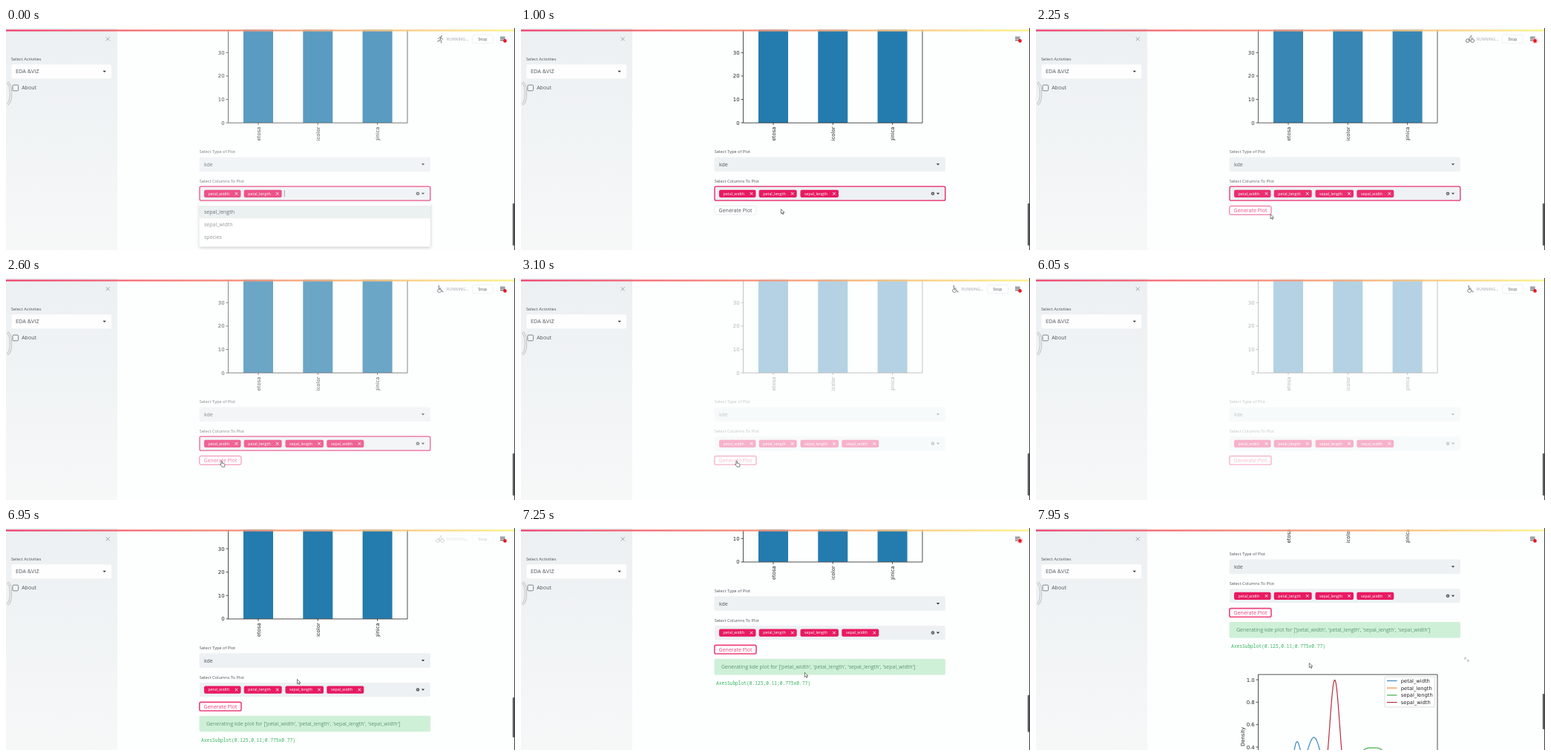
These frames come from a looping animation (686 px wide and 300 px high, 8000 ms). An HTML page:

```html
<!DOCTYPE html>
<html lang="en">
<head>
<meta charset="utf-8">
<title>Plot builder</title>
<style>
  html, body { margin: 0; width: 100%; height: 100%; overflow: hidden; background: #fdfefe; }
  svg { display: block; width: 686px; height: 300px; }
  text { font-family: "Open Sans", "Noto Sans", sans-serif; font-size: 7px; fill: #50555c; white-space: pre; }
  .label { font-size: 5.7px; }
  .chip { font-size: 5.3px; font-weight: 500; fill: #fff; }
  .plot text { font-family: "DejaVu Sans", sans-serif; font-size: 6.9px; fill: #222; }
  .plot .key { font-size: 6.75px; }
  .code { font-family: "Noto Sans Mono", monospace; font-size: 6.23px; fill: #35b65c; }
  .status { font-size: 5.5px; fill: #a0a4ab; }
</style>
</head>
<body>
<svg id="stage" viewBox="0 0 686 300" xmlns="http://www.w3.org/2000/svg">
  <defs>
    <linearGradient id="side" x2="0" y2="1">
      <stop stop-color="#ecf0f2"/><stop offset="1" stop-color="#f6f8f8"/>
    </linearGradient>
    <linearGradient id="ribbon"><stop stop-color="#f0406f"/><stop offset="1" stop-color="#fbf389"/></linearGradient>
    <clipPath id="figure"><rect x="270" y="-10" width="290" height="162"/></clipPath>
    <filter id="shadow" x="-5%" y="-20%" width="110%" height="150%">
      <feDropShadow dx="0" dy="1.5" stdDeviation="2" flood-opacity=".22"/>
    </filter>
  </defs>
</svg>
<script>
const LOOP = 8000, PINK = '#e81a61', FIELD = '#edf1f3';
const stage = document.getElementById('stage');

function add(parent, tag, attrs = {}, content) {
  const el = document.createElementNS(stage.namespaceURI, tag);
  for (const key in attrs) el.setAttribute(key, attrs[key]);
  if (content !== undefined) el.textContent = content;
  parent.appendChild(el);
  return el;
}
const group = (parent, attrs) => add(parent, 'g', attrs);
const box = (parent, x, y, width, height, attrs) => add(parent, 'rect', { x, y, width, height, ...attrs });
const write = (parent, x, y, content, attrs) => add(parent, 'text', { x, y, ...attrs }, content);
const draw = (parent, d, stroke, width = 1, attrs) =>
  add(parent, 'path', { d, stroke, 'stroke-width': width, fill: 'none', ...attrs });
const caret = (parent, x, y) => add(parent, 'path', { d: `M${x - 2.2} ${y - 1}h4.4l-2.2 2.3z`, fill: '#30343a' });
const show = (el, on) => el.setAttribute('display', on ? 'inline' : 'none');
const set = (el, attrs) => { for (const key in attrs) el.setAttribute(key, attrs[key]); };

// Linear interpolation through rows of [time, ...values].
function track(rows, t) {
  if (t <= rows[0][0]) return rows[0].slice(1);
  for (let i = 1; i < rows.length; i++) {
    const [a, b] = [rows[i - 1], rows[i]];
    if (t < b[0]) {
      const p = (t - a[0]) / (b[0] - a[0]);
      return a.slice(1).map((v, k) => v + (b[k + 1] - v) * p);
    }
  }
  return rows[rows.length - 1].slice(1);
}

// Page content
const page = group(stage);
const content = group(page);

const bars = group(content, { class: 'plot', 'clip-path': 'url(#figure)' });
['setosa', 'versicolor', 'virginica'].forEach((name, i) => {
  const x = 340 + i * 80.3;
  box(bars, x - 20, -8, 40, 136, { fill: '#247bad' });
  draw(bars, `M${x} 128v3`, '#222', .8);
  write(bars, 0, 0, name, { transform: `translate(${x + 2.6} 133.5) rotate(-90)`, 'text-anchor': 'end' });
});
draw(bars, 'M299.5 -9V128.2H541V-9', '#222', .8);
[30, 20, 10, 0].forEach((n, i) => {
  const y = 33.3 + i * 31.6;
  draw(bars, `M296.5 ${y}h3`, '#222', .8);
  write(bars, 294.6, y + 2.5, n, { 'text-anchor': 'end' });
});

write(content, 260.8, 169.3, 'Select Type of Plot', { class: 'label' });
box(content, 260.5, 174.5, 311.5, 19.5, { rx: 2, fill: FIELD });
write(content, 267, 186.8, 'kde');
caret(content, 562, 184.3);

write(content, 260.8, 209, 'Select Columns To Plot', { class: 'label' });
const multi = box(content, 261, 214.2, 310.8, 19, { rx: 2, fill: FIELD, 'stroke-width': 1.3 });
add(content, 'circle', { cx: 555, cy: 223.8, r: 2.3, fill: '#555a60' });
draw(content, 'M554.1 222.9l1.8 1.8m0-1.8l-1.8 1.8', FIELD, .6);
caret(content, 562, 223.8);
const chips = [['petal_width', 267, 49.5], ['petal_length', 320.7, 51], ['sepal_length', 376.5, 51.5], ['sepal_width', 432.3, 50]]
  .map(([name, x, w]) => {
    const chip = group(content);
    box(chip, x, 218.7, w, 10.2, { rx: 2, fill: PINK });
    write(chip, x + 5.6, 225.6, name, { class: 'chip' });
    draw(chip, `M${x + w - 7.7} 222.1l3.4 3.4m0-3.4l-3.4 3.4`, '#fff', .9);
    return chip;
  });
const textCaret = draw(content, 'M375.3 219.3v9', '#555', .7);

const button = box(content, 260.8, 240.6, 56.2, 11.6, { rx: 2, fill: '#fff' });
const buttonText = write(content, 266.6, 249, 'Generate Plot');

const result = group(content);
box(result, 260.5, 259, 311.5, 21.6, { rx: 2, fill: '#cef0d6' });
write(result, 270, 272.3, "Generating kde plot for ['petal_width', 'petal_length', 'sepal_length', 'sepal_width']", { fill: '#5c9577', style: 'fill:#5c9577' });
write(result, 263, 294.3, 'AxesSubplot(0.125,0.11;0.775x0.77)', { class: 'code' });

// Density plot
const density = group(content, { class: 'plot' });
const zero = 488.6, unit = 151.5;
const bell = (x, mean, sigma, height) => height * Math.exp(-(((x - mean) / sigma) ** 2) / 2);
function curve(color, from, to, f) {
  let d = '';
  for (let x = from; x <= to; x += .5) d += `${d ? 'L' : 'M'}${x} ${(zero - unit * f(x)).toFixed(2)}`;
  draw(density, d, color, 1.2);
}
curve('#3b8bc4', 325, 410, x => bell(x, 351, 5.5, .395) + bell(x, 374.5, 11, .486));
curve('#3fae49', 400, 510, x => bell(x, 441, 13, .324) + bell(x, 467, 13, .324));
curve('#b5303f', 370, 435, x => bell(x, 402.6, 6.6, .998));
draw(density, 'M299.5 488V330H541V488', '#222', .8);
['1.0', '0.8', '0.6', '0.4'].forEach((n, i) => {
  const y = 337.1 + i * 30.3;
  draw(density, `M296.5 ${y}h3`, '#222', .8);
  write(density, 294.6, y + 2.5, n, { 'text-anchor': 'end' });
});
write(density, 0, 0, 'Density', { transform: 'translate(280.8 414) rotate(-90)', 'text-anchor': 'middle' });
box(density, 470, 333, 67.5, 41, { rx: 1.5, fill: '#fff', stroke: '#d0d0d0', 'stroke-width': .7 });
[['petal_width', '#3b8bc4'], ['petal_length', '#f2933f'], ['sepal_length', '#3fae49'], ['sepal_width', '#b5303f']]
  .forEach(([name, color], i) => {
    const y = 338.5 + i * 9.7;
    draw(density, `M473 ${y}h13.5`, color, 1.2);
    write(density, 491.8, y + 2.3, name, { class: 'key' });
  });
draw(density, 'M577.8 309.8v-2.2h2.2m-2.2 0l2 1.8M583 309.8v2.2h-2.2m2.2 0l-2-1.8', '#9a9ea4', .7);

// Option list
const menu = group(page);
const menuBox = box(menu, 260.8, 236.3, 311.2, 59, { rx: 1.5, fill: '#fff', filter: 'url(#shadow)' });
box(menu, 260.8, 240, 311.2, 17.2, { fill: '#ebf0f1' });
const options = [0, 1, 2].map(i =>
  write(menu, 267, 250.7 + i * 17.3, '', { style: `fill:${i ? '#97999c' : '#6c7175'}` }));

// Sidebar and header
box(stage, 0, 0, 150, 300, { fill: 'url(#side)' });
draw(stage, 'M134.7 12.3l5 5m0-5l-5 5', '#9a9fa6', .9);
write(stage, 7, 44, 'Select Activities', { class: 'label' });
box(stage, 7.5, 49.2, 134.5, 19, { rx: 2, fill: '#fefefe' });
write(stage, 13, 61.3, 'EDA &VIZ', { style: 'font-size:7.3px' });
caret(stage, 132.7, 58.8);
box(stage, 8.9, 77.1, 7.7, 7.7, { rx: 1.3, fill: '#f4f6f7', stroke: '#71767c', 'stroke-width': .9 });
write(stage, 21.2, 83.4, 'About');
const edge = 'M2 73.5C8 78 8 99 2 103';
draw(stage, edge, '#b5babc', 3.4);
draw(stage, edge, '#e6eaeb', 2);
box(stage, 150, 0, 536, 2, { fill: '#fdfefe' });
box(stage, 0, 2.2, 686, 2.3, { fill: 'url(#ribbon)' });

// Run status
const status = group(stage);
const icons = [
  'M582.6 14.5l1.6-1.8h2l1 2 1.6.2M586 12.7l-1 3 1.8 1.3-.4 3M585 15.7l-1 2h-2.4',
  'M584 17.2a2.3 2.3 0 1 1-4.6 0a2.3 2.3 0 1 1 4.6 0M590.6 17.2a2.3 2.3 0 1 1-4.6 0a2.3 2.3 0 1 1 4.6 0M585 17.8v-2l-2-1.3 2.4-2 1.4 1.6h1.8',
  'M583.5 12.5l.6 3.4h2.8l1.2 3 1-.3M583.6 14h2.6M582.9 14.9a2.5 2.5 0 1 0 3.6 3'
].map((d, i) => {
  const icon = group(status);
  draw(icon, d, '#777b81', 1, { 'stroke-linecap': 'round', 'stroke-linejoin': 'round' });
  add(icon, 'circle', { cx: [586.8, 586.4, 583.3][i], cy: 11, r: .9, fill: '#777b81' });
  return icon;
});
write(status, 593.8, 17, 'RUNNING...', { class: 'status' });
box(status, 628.5, 9.3, 27.8, 11.4, { rx: 2, fill: '#fff', stroke: '#e9ebed', 'stroke-width': .7 });
write(status, 636.2, 17, 'Stop', { class: 'label' });

draw(stage, 'M666 12.4h6.6m-6.6 2.2h6.6m-6.6 2.2h6.6', '#40444a', 1);
const halo = add(stage, 'circle', { cx: 672.5, cy: 17.3, r: 4, fill: '#f7a3b0', opacity: .5 });
add(stage, 'circle', { cx: 672.5, cy: 17.4, r: 2.3, fill: '#e8151f' });
const thumb = box(stage, 682.8, 237, 2.4, 57, { rx: 1, fill: '#5b5e61' });
box(stage, 685.2, 0, .8, 300, { fill: '#161616' });

// Pointer
const pointer = group(stage);
const ink = { fill: '#fff', 'stroke-linejoin': 'round' };
const arrow = draw(pointer, 'M0 0v6.2l1.5-1.3 1 2.2 1-.5-1-2.1h2z', '#444', .7, ink);
const hand = draw(pointer, 'M0 .6q.7-1.2 1.4 0v2.6l2.8.7q1 .4.8 1.6l-.6 2.7h-3.2l-2.6-3.3q0-1 1.4-.2z', '#444', .7, ink);

// Timeline
const SCROLL = [[6900, 0], [6950, 5], [7150, 60], [7400, 115], [7600, 132]];
const THUMB = [[6550, 237, 57], [6600, 228.5, 54], [6950, 229, 54], [7400, 224, 48]];
const STATUS = [[550, 1], [750, 0], [1200, 0], [1300, 1], [6750, 1], [7050, 0]];
const POINTER = [[450, 420, 258], [900, 350.5, 244.8], [1050, 350.5, 244.8], [1300, 420, 222], [1400, 420, 222],
  [1700, 340, 247], [1800, 338, 247], [2200, 316, 251.6], [2300, 316, 251.6], [2600, 290, 247],
  [6300, 330, 240], [6800, 392.5, 204.5], [7000, 392.5, 204.5], [7600, 368.3, 182.5]];
const CLOSED = 950, REOPENED = 1350, CHOSEN = 1750, CLICKED = 2700, DONE = 6600;

const fade = ms => 1 - .67 * Math.min(1, Math.max(0, ms) / 1000) ** 1.7;
const between = (t, a, b) => t >= a && t < b;

function render(t) {
  const first = t < CLOSED, open = first || between(t, REOPENED, CHOSEN);
  const staleOpacity = t < 550 ? fade(t + 550) : t < DONE ? fade(t - 1950) : 1;
  set(page, { transform: `translate(0 ${-track(SCROLL, t)[0]})` });
  set(content, { opacity: staleOpacity });

  show(chips[2], !first);
  show(chips[3], t >= CHOSEN);
  show(textCaret, open && t % 1000 < 500);
  set(multi, { stroke: t < CLICKED ? PINK : 'none' });

  show(menu, open);
  const names = first ? ['sepal_length', 'sepal_width', 'species'] : ['sepal_width', 'species', ''];
  options.forEach((option, i) => { option.textContent = names[i]; });
  set(menuBox, { height: first ? 59 : 42 });

  const focused = t >= CLICKED, hovered = t >= 2050;
  set(button, { stroke: focused ? '#ee4179' : hovered ? PINK : '#e6e9eb', 'stroke-width': focused ? 1.6 : .8 });
  buttonText.style.fill = hovered ? '#ec3f77' : '';
  show(result, t >= DONE);
  show(density, t >= 7700);

  set(status, { opacity: track(STATUS, t)[0] });
  icons.forEach((icon, i) => show(icon, Math.floor(t / 520) % icons.length === i));
  show(halo, between(t % 2450, 2150, 2400));
  const [y, height] = track(THUMB, t);
  set(thumb, { y, height });

  const onButton = between(t, 2400, 3900);
  const [px, py] = track(POINTER, between(t, 2600, 3900) ? 2600 : t);
  show(pointer, between(t, 450, 3900) || t >= 6300);
  show(hand, onButton);
  show(arrow, !onButton);
  set(pointer, { transform: `translate(${px} ${py})` });
}

const start = performance.now();
function tick() {
  render((performance.now() - start) % LOOP);
  requestAnimationFrame(tick);
}
tick();
</script>
</body>
</html>
```
